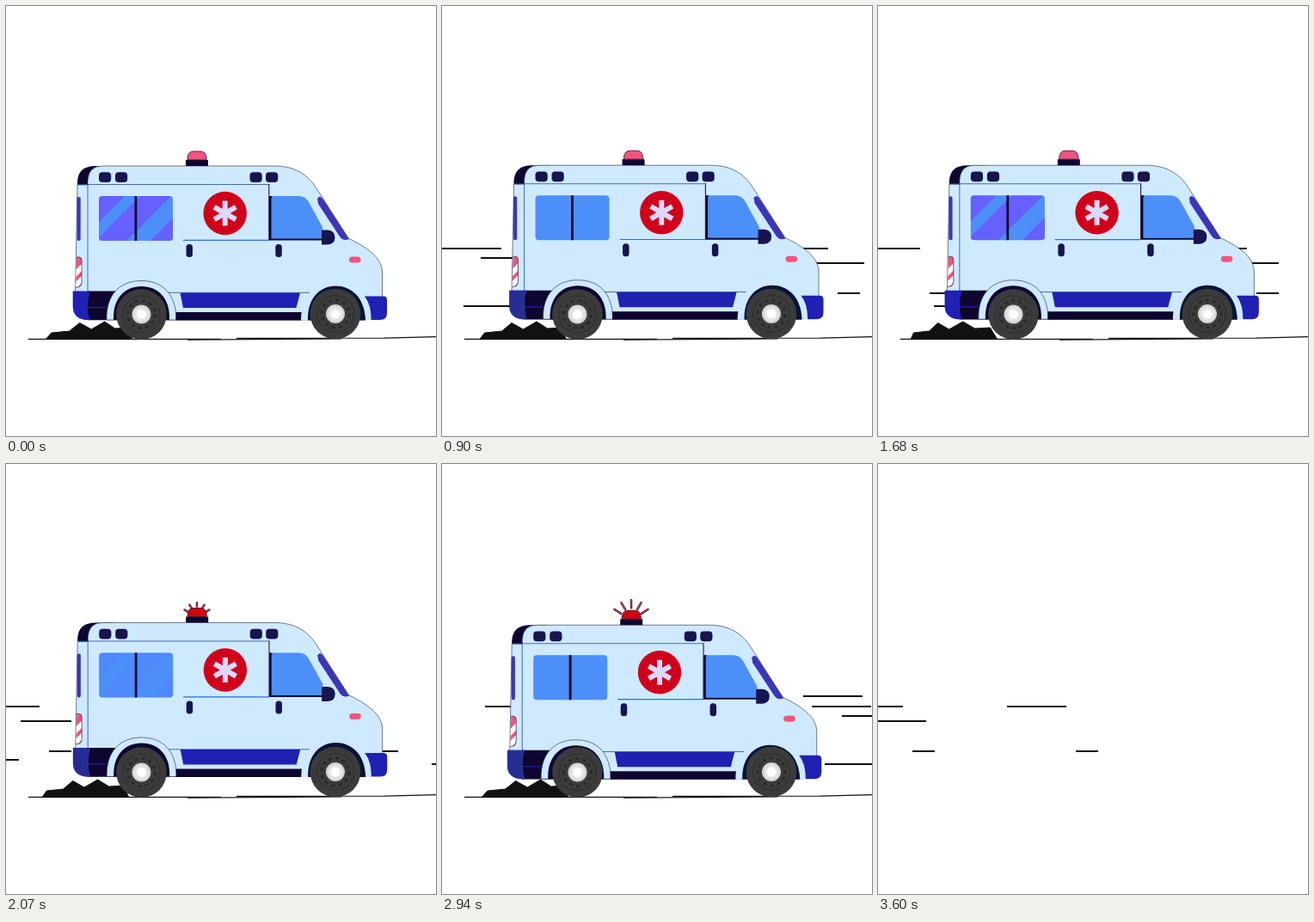
An HTML page that plays this animation: 500 px wide and 500 px high, repeating every 3.63 s.

```html
<!DOCTYPE html>
<html lang="en">
<head>
<meta charset="utf-8">
<title>Ambulance</title>
<style>
  html, body { margin: 0; width: 100%; height: 100%; overflow: hidden; background: #fff; }
  svg { display: block; width: 500px; height: 500px; }
  .sky { fill: #cfe9ff; }
  .navy { fill: #17144f; }
  .ink { fill: #0e0630; }
  .blue { fill: #2020b2; }
  .glass { fill: #4d8ff8; }
  .violet { fill: #3a36b5; }
  .pink { fill: #f0557f; }
  .edge { stroke: #1a2740; stroke-width: .6; }
  .seam { fill: none; stroke: #23508f; stroke-width: .8; }
  #lines path { fill: none; stroke: #111; stroke-width: 2; }
</style>
</head>
<body>
<svg viewBox="0 0 500 500">
  <defs>
    <clipPath id="pane"><rect x="108" y="221" width="86" height="52" rx="4"/></clipPath>
    <clipPath id="tail"><path d="M82 292h3q3 0 3 4v24q0 7-5 7h-2l1-33z"/></clipPath>
    <g id="wheel">
      <circle r="29.3" fill="#3b3b3b"/>
      <circle r="21.5" fill="none" stroke="#2c2c2c"/>
      <circle id="spin" r="16" fill="none" stroke="#292929" stroke-width="3" stroke-dasharray="4 4.38"/>
      <circle r="11" fill="#d2d2d2"/>
      <circle r="9" fill="#e4e4e4"/>
      <circle r="5.5" fill="#fff"/>
    </g>
  </defs>
  <g id="lines"></g>
  <g id="scene">
    <path d="M26 387.4H250M211 388.2L390 387M268 386.3L445 386M440 386.2L500 384.6" fill="none" stroke="#111" stroke-width="1.2"/>
    <path id="smoke" fill="#111" stroke="#111" stroke-linejoin="round"/>
    <g id="van">
      <path class="ink" d="M83 208V204Q84 186 104 186H125V208Z"/>
      <path class="sky edge" d="M95 208V203Q96 186 112 186H312C336 186 351 196 361 212L398 270C425 283 437 295 437.5 309V345L415 365H95L80.5 334 83 208Z"/>
      <path class="seam" d="M83 207.5H306M95 207V332M188 333.3H353"/>
      <path class="seam" d="M206 272.3H306" style="stroke:#2a6fd8;stroke-width:1.2"/>
      <path d="M305.8 207V272" stroke="#0e0630"/>
      <g id="knobs" class="navy"></g>

      <rect class="glass" x="108" y="221" width="86" height="52" rx="4"/>
      <g id="shine" clip-path="url(#pane)" fill="#6560ff"></g>
      <rect class="ink" x="149.5" y="221" width="2.8" height="52"/>

      <path class="ink" d="M306 221H310V270H368V272.6H306Z"/>
      <path class="glass" d="M308.5 224Q308.5 221 312 221H340Q348 221 352 228L368 257V270.4H308.5Z"/>
      <path class="violet" d="M362 224Q365 219 369 225L399 271Q392 274 388 268L363 230Z"/>
      <path class="navy" d="M367 260.5H374Q382.5 261 382.5 269T374 277.5H367Z"/>
      <rect class="pink" x="399" y="291.5" width="13.5" height="7" rx="3.4"/>

      <circle cx="254.7" cy="241" r="25.2" fill="#d0021b"/>
      <g id="star" fill="#dcd8ff"></g>

      <rect class="violet" x="82.5" y="222" width="4.2" height="51" rx="2"/>
      <g clip-path="url(#tail)">
        <rect class="pink" x="78" y="291" width="12" height="37"/>
        <path d="M78 314L90 302M78 328L90 316" stroke="#fff" stroke-width="6"/>
      </g>
      <path d="M82 292h3q3 0 3 4v24q0 7-5 7h-2" fill="none" stroke="#26203a" stroke-width=".7"/>

      <path class="ink" d="M95 331.5H130V365H95Z"/>
      <path class="blue" d="M77.700 331.500H98Q95 340 95 350H117V351H95Q95 359 98 365H92Q77.700 363 77.700 349Z"/>
      <path id="shade" fill="#2a3484" d="M77.700 331.500H98Q93 348 98 365H92Q77.700 363 77.700 349Z"/>
      <path class="sky edge" d="M117 365C116 335 133 319.500 157.500 319.500S198 335 198 365Z"/>
      <path class="ink" d="M125 365C124 340 138 326 157.500 326S191 340 190 365Z"/>
      <path class="blue" d="M202.500 333.500H342L337.500 351H206Z"/>
      <rect class="ink" x="197.500" y="356" width="147" height="9.500"/>
      <path class="sky" d="M343 365.500Q343 338 362 330H410Q425 340 424 365.500Z"/>
      <path d="M351 365.500C350 340 365 325.500 383 325.500S417 338 418 365.500Z" fill="#06133a"/>
      <path class="blue" d="M417 337.500H439Q443 337.500 443 342V357Q443 365 435 365H424.500Q425 348 417 337.500Z"/>

      <rect class="ink" x="209" y="179" width="26" height="7"/>
      <path id="lamp" d="M211 179V176Q212 169 218 169H226Q232 169 233 176V179Z" stroke="#3a0a1c" stroke-width=".8"/>
      <g id="rays" transform="translate(221.800 180)" fill="none"></g>
    </g>
    <use href="#wheel" x="157.500" y="358.500"/>
    <use href="#wheel" x="383" y="358"/>
  </g>
</svg>
<script>
const LOOP = 3630, STEP = 30;
const $ = id => document.getElementById(id);
const make = (parent, tag, attrs = {}) => {
  const el = document.createElementNS('http://www.w3.org/2000/svg', tag);
  for (const k in attrs) el.setAttribute(k, attrs[k]);
  return parent.appendChild(el);
};

// Repeated parts of the van
for (const x of [108, 127, 283.5, 302]) make($('knobs'), 'rect', {x, y: 193.3, width: 14.2, height: 11.7, rx: 4});
for (const x of [209.5, 313.3]) make($('knobs'), 'rect', {x, y: 277, width: 7.5, height: 15, rx: 3.5});
for (const a of [0, 60, 120])
  make($('star'), 'rect', {x: 251.7, y: 226.5, width: 6, height: 29, rx: .6, transform: `rotate(${a} 254.7 241)`});
for (const [a, b] of [[0, 30], [48, 84], [112, 138]])
  make($('shine'), 'path', {d: `M${108 + a} 221H${108 + b}l-52 52H${56 + a}Z`});
const rays = [-58, -30, 0, 30, 58].flatMap(angle => {
  const g = make($('rays'), 'g', {transform: `rotate(${angle})`});
  return [['#24101c', 2.5], ['#d8406c', 1.2]].map(([stroke, w]) =>
    make(g, 'path', {stroke, 'stroke-width': w, 'stroke-linecap': 'round'}));
});

// Speed lines [y, offset, length] travel in sets at 1 px per ms;
// each set reaches the left edge at `first` and again `every` ms
const sets = [
  {first: 600, every: 190, parts: [[282, -80, 69], [334, 0, 26]]},
  {first: 577, every: 755, parts: [[299, 0, 59], [344, -28, 26]]},
  {first: 500, every: 715, parts: [[270, 0, 69]]},
  {first: 945, every: 820, parts: [[293, 0, 62], [349, -20, 70]]}
];
const passes = [];
for (const {first, every, parts} of sets)
  for (let at = first; at < LOOP + 300; at += every) {
    const d = parts.map(([y, dx, len]) => `M${dx} ${y}h${len}`).join('');
    passes.push({at, el: make($('lines'), 'path', {d})});
  }

// Body sway: time, x, y
const sway = [
  [0, 0, 0], [540, 1.5, -1.5], [1290, -.5, 0], [2070, .2, -1.5],
  [2640, -2, 0], [3240, -1.5, 2.5], [LOOP, 0, 0]
];
function swayAt(t) {
  const i = sway.findIndex(k => k[0] > t), a = sway[i - 1], b = sway[i];
  const u = (t - a[0]) / (b[0] - a[0]), e = u * u * (3 - 2 * u);
  return [1, 2].map(j => a[j] + (b[j] - a[j]) * e);
}

// Smoke outline; its middle shifts further than its ends
const puff = [[38, 387], [41, 380], [59, 378], [69, 368.5], [82, 376], [98, 367], [112, 375], [130, 374], [138, 387]];
const smokeAt = s => 'M' + puff.map(([x, y], i) =>
  [x + s * (9 + 9 * Math.sin(Math.PI * i / (puff.length - 1))), y]).join('L') + 'Z';

function draw(now) {
  const n = Math.floor(now % LOOP / STEP), t = n * STEP;
  for (const {at, el} of passes) el.setAttribute('transform', `translate(${at - t})`);
  $('scene').style.display = n < 120 ? '' : 'none';
  $('van').setAttribute('transform', `translate(${swayAt(t)})`);
  $('smoke').setAttribute('d', smokeAt(.5 + .5 * Math.cos((n - 1) * Math.PI / 8)));
  $('spin').setAttribute('transform', `rotate(${n * 40})`);

  // The lamp flashes every 8 steps, the glass glints every 4
  const reach = 26 - 2 * (n % 8 - 3) ** 2, lit = reach > 10;
  $('lamp').setAttribute('fill', lit ? '#d3000f' : '#f0557f');
  $('rays').style.display = lit ? '' : 'none';
  for (const ray of rays) ray.setAttribute('d', `M0 ${-Math.min(14, reach - 5)}V${1 - reach}`);
  const glint = (.5 + .5 * Math.cos(n * Math.PI / 2)) ** 3;
  $('shine').setAttribute('opacity', glint);
  $('shade').setAttribute('opacity', .7 * (1 - glint));
}

const start = performance.now();
(function tick() {
  draw(performance.now() - start);
  requestAnimationFrame(tick);
})();
</script>
</body>
</html>
```
